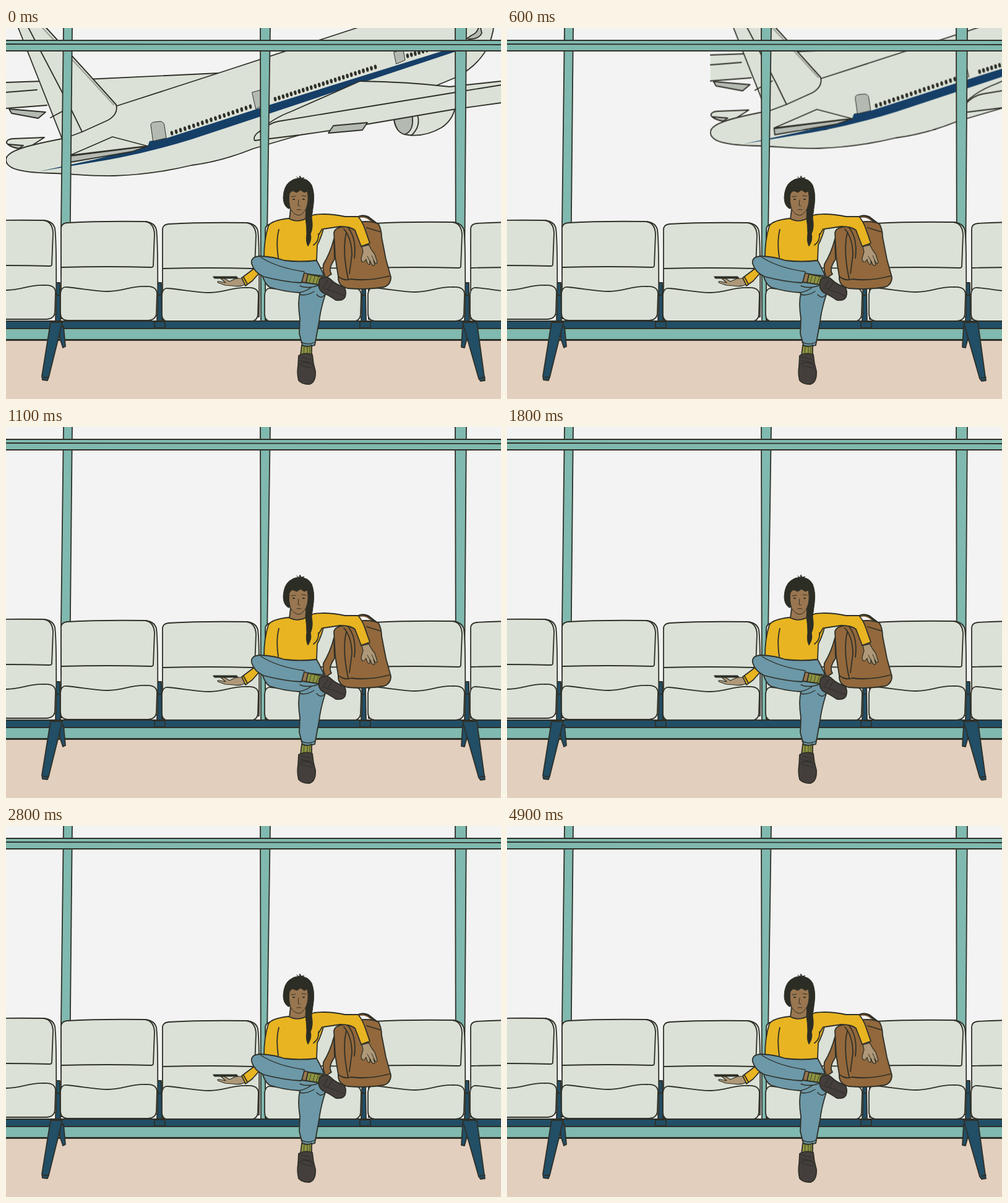
Animation, 800 px wide and 600 px high, one loop 5 s. Source, as an HTML page:

```html
<!DOCTYPE html>
<html lang="en">
<head>
<meta charset="utf-8">
<title>Departure lounge</title>
<style>
html, body { margin: 0; width: 100%; height: 100%; overflow: hidden; background: #f3f3f3; }
svg { display: block; width: 100vw; height: 100vh; }
.ink { stroke: #2f3028; stroke-width: 1.8; stroke-linejoin: round; stroke-linecap: round; }
.line { fill: none; }
.pale { fill: #dbe1d7; }
.grey { fill: #b4b9b2; }
.teal { fill: #80b9af; }
.navy { fill: #224e66; }
.skin { fill: #997650; }
.hand { fill: #ae9878; }
.wool { fill: #e8b421; }
.denim { fill: #6c98a8; }
.sock { fill: #8d9440; }
.shoe { fill: #443e3c; }
.bag { fill: #92683c; }
.hair { fill: #2c2d24; }
</style>
</head>
<body>
<svg viewBox="0 0 800 600">
  <defs>
    <g id="chair" class="ink">
      <path class="pale" d="M89 470 L89 324 Q89 316 99 315 Q150 312 224 313 Q240 314 243 326 Q246 345 245 465 Z"/>
      <path class="line" d="M226 313 Q239 316 240 333 L238 384 Q238 387 234 387 Q165 385 90 387"/>
      <path class="pale" d="M88 430 Q89 418 98 419 C122 421 143 426 165 426 C190 426 200 417 226 418 Q243 417 244 429 L243 462 Q242 472 230 473 L99 473 Q88 472 88 461 Z"/>
    </g>
    <g id="post" class="ink">
      <path d="M246 321 L252 321 L252 413 L246 413 Z" fill="#f0f2ef" stroke="none"/>
      <path class="navy" d="M245 412 L251 412 L252 475 L244 475 Z"/>
      <path class="line" d="M246 432 L251 432"/>
    </g>
  </defs>

  <rect width="800" height="600" fill="#f3f3f3"/>

  <g id="plane" class="ink">
    <path class="pale" d="M0 88 L343 73 L178 126 L60 126 L0 130 Z" stroke="none"/>
    <path class="line" d="M0 88 L88 85 L343 73 M0 130 L66 125 M0 104 L50 100"/>
    <path class="grey" d="M5 131 L64 136 L52 146 L9 138 Z"/>
    <path class="pale" d="M1 186 Q0 180 12 179 L62 177 L34 195 L20 195 Q4 191 1 186 Z"/>
    <path class="grey" d="M3 188 L28 190 L21 195 Q8 193 3 188 Z"/>
    <path class="pale" d="M0 213 C0 200 28 191 91 179 Q165 150 179 126 L343 73 L600 -11 L650 -45 L788 -45 C794 5 784 50 727 80 C650 112 570 145 475 173 L400 195 Q348 216 300 222 Q238 237 175 239 C135 240 110 236 78 235 C28 234 0 229 0 213 Z"/>
    <path fill="#163f68" stroke="none" d="M53 232 L142 213 L229 191 L232 183 L260 178 L427 124 L700 39 L733 30 L727 38 L427 138 L300 180 Q220 205 142 217 Z"/>
    <path class="pale" d="M12 -20 L91 180 L123 168 L165 149 Q182 139 178 124 L132 73 L47 -20 Z"/>
    <path class="line" d="M26 -20 L107 135 L123 168 M72 145 L100 130"/>
    <path class="line" d="M49 -11 L130 76 L174 124" stroke="#a1a69d" stroke-width="2.5"/>
    <path class="line" d="M47 -20 L132 73 L178 124"/>
    <path class="grey" d="M103 207 L229 191 L203 200 L104 217 Z"/>
    <path class="pale" d="M103 206 L140 190 L172 176 L229 191 L210 193 Z"/>
    <g class="grey" stroke-width="1">
      <path d="M234 157 Q234 153 240 152 L250 151 Q256 153 256 158 L259 178 L238 183 Z"/>
      <path d="M398 104 L412 100 L418 123 L404 131 Z"/>
      <path d="M627 39 L642 35 L645 52 L631 58 Z"/>
    </g>
    <g id="ports" fill="#2f3028" stroke="none"></g>
    <path class="grey" d="M745 17 L752 12 Q764 8 765 -8 L769 8 Q765 18 748 18 Z"/>
    <path class="pale" d="M627 146 Q628 166 644 172 Q675 178 704 161 Q722 149 726 128 Z"/>
    <path class="grey" d="M627 145 Q629 168 644 172 Q661 167 656 138 Z"/>
    <path class="line" d="M664 138 Q672 158 655 174"/>
    <path class="pale" d="M402 182 Q398 175 410 167 Q429 147 461 135 L572 86 Q650 87 717 95 L800 86 L1000 55 L1000 95 L800 121 L727 131 L523 166 L475 173 Z"/>
    <path class="line" d="M411 169 Q423 154 440 151 L727 104 L1000 60"/>
    <path class="grey" d="M529 158 L584 153 L576 165 L521 170 Z"/>
  </g>

  <g class="ink">
    <path class="teal" d="M93 -3 L107 -3 L103 400 L88 400 Z"/>
    <path class="teal" d="M411 -3 L427 -3 L420 474 L412 474 Z"/>
    <path class="teal" d="M726 -3 L744 -3 L741 400 L727 400 Z"/>
    <path class="teal" d="M-3 20 L803 20 L803 37 L-3 37 Z"/>
    <path class="line" d="M0 26 L800 27"/>
    <rect x="-3" y="505" width="806" height="98" fill="#e3cfbe"/>
    <path class="teal" d="M-3 485 L803 485 L803 504 L-3 504 Z"/>
  </g>

  <g id="seats"></g>

  <g class="ink navy">
    <path d="M-3 474 L803 474 L803 486 L-3 486 Z"/>
    <path d="M240 475 h17 v10 h-17 Z M572 475 h17 v10 h-17 Z"/>
    <path d="M86 485 L93 482 L96 515 L92 517 L87 502 Z"/>
    <path d="M72 476 L91 476 L69 565 L67 570 L59 569 L58 563 Z"/>
    <path d="M745 485 L738 482 L736 516 L741 517 L745 502 Z"/>
    <path d="M738 476 L761 476 L773 564 L774 570 L767 571 L764 567 Z"/>
    <path class="line" d="M61 565 L68 565 M767 566 L774 565"/>
  </g>

  <g class="ink" stroke-width="1.6">
    <path class="line" d="M568 307 Q575 302 585 306 L598 316" stroke-width="4"/>
    <path class="line" d="M569 307 Q576 304 584 308 L595 316" stroke="#92683c" stroke-width="1.4"/>
    <path class="bag" d="M530 341 Q524 364 513 382 Q511 394 517 404 L526 398 Q520 390 531 374 Z"/>
    <path class="bag" d="M530 331 Q532 322 548 321 L568 314 Q591 311 602 317 Q607 326 607 338 L614 374 L622 403 Q622 415 611 419 Q583 424 552 421 Q536 417 537 402 L532 370 Z"/>
    <path class="line" d="M546 325 Q559 340 559 367 L555 397 M553 323 Q567 341 563 372 M550 331 Q543 360 553 406 M537 402 Q548 410 558 406 Q586 410 620 401 M583 323 L606 330"/>

    <path class="skin" d="M460 292 L486 292 L489 308 Q474 316 458 309 Z"/>
    <path class="wool" d="M457 308 Q473 317 490 305 L498 302 Q520 299 548 305 L569 305 Q576 313 580 325 L588 348 L574 353 L564 327 Q557 321 540 321 L513 325 Q509 340 503 351 L502 376 Q470 382 438 374 L430 377 L417 371 Q417 342 424 320 Q429 311 457 308 Z"/>
    <path class="line" d="M441 326 Q436 345 440 371 M505 333 Q506 345 497 351 M511 325 L505 335"/>
    <path class="wool" d="M401 389 L412 393 L398 409 L387 417 L381 404 Z"/>
    <path class="line" d="M384 403 L390 414"/>
    <path class="hand" stroke-width="1.2" d="M381 405 L386 415 Q378 419 367 417 L354 416 L343 412 Q340 409 346 410 L355 412 L347 405 Q352 403 361 410 L372 405 Z"/>
    <path class="hair" stroke-width="1" d="M335 402 L373 402 L375 405 L337 405 Z"/>
    <path class="hand" stroke-width="1.2" d="M575 353 L586 350 Q590 359 596 366 L600 379 Q598 384 594 376 L596 383 Q592 387 588 376 L588 382 Q584 384 582 374 L579 378 Q574 380 574 372 L577 362 Z"/>
    <path class="line" stroke-width="1" d="M591 368 L596 379 M584 369 L590 380 M574 354 L587 351"/>

    <path class="denim" d="M414 399 Q418 414 426 419 Q450 427 475 428 Q471 444 475 470 L474 494 L479 513 Q489 517 499 513 L506 475 Q508 456 516 431 Q512 412 500 406 Z"/>
    <path class="denim" d="M397 381 Q395 370 410 369 Q434 370 450 376 Q476 379 502 376 Q509 388 514 401 L486 398 L477 412 Q451 411 416 402 Q401 395 397 381 Z"/>
    <path class="line" d="M412 371 Q439 388 482 394 M475 417 Q488 423 508 415 M474 428 Q487 425 494 419 M475 431 Q485 434 498 426 M502 431 Q510 440 516 430 M477 508 Q489 514 499 508" stroke-width="1.4"/>
    <path class="skin" d="M482 396 L489 398 L485 412 L478 411 Z"/>
    <path class="sock" d="M488 398 L512 403 L505 415 L485 412 Z"/>
    <path class="line" d="M493 401 L490 412 M499 402 L496 413 M505 403 L501 414" stroke-width=".8"/>
    <path class="shoe" d="M507 406 Q517 399 525 407 Q533 415 546 419 Q551 425 548 435 Q544 442 533 440 Q521 432 512 428 Q502 421 507 406 Z"/>
    <path class="line" d="M511 420 Q528 425 547 433 M520 408 L514 418 M527 412 L520 423" stroke-width="1.2"/>
    <path class="sock" d="M478 513 Q487 517 494 513 L494 529 L476 529 Z"/>
    <path class="line" d="M482 515 L481 529 M487 516 L487 529 M491 515 L491 528" stroke-width=".8"/>
    <path class="shoe" d="M473 530 Q483 524 495 528 Q496 542 500 555 Q501 572 491 576 Q479 577 473 570 Q470 558 472 547 Z"/>
    <path class="line" d="M474 544 Q485 537 497 546 M477 532 L492 536 M476 538 L493 541 M477 546 L495 550" stroke-width="1.2"/>

    <path class="hair" stroke-width="1" d="M456 292 Q448 287 448 274 Q449 256 458 249 Q465 243 474 243 Q488 243 494 254 Q499 267 497 284 L494 307 Q497 323 492 333 Q495 342 488 353 Q484 345 486 333 Q486 320 484 307 L485 288 Z"/>
    <path class="hair" stroke-width="1" d="M470 241 L474 244 L475 239 L477 243 L482 242 L476 246 Z"/>
    <path class="skin" d="M458 268 Q462 262 465 264 L470 266 L476 262 L482 266 L487 264 Q490 280 485 292 Q479 303 473 303 Q465 302 460 293 Q456 280 458 268 Z" stroke-width="1"/>
    <path class="line" d="M461 273 L468 272 M478 271 L485 272 M473 278 L472 287 L475 288 M470 294 Q473 293 477 294" stroke-width="1"/>
    <path class="line" d="M464 277 h2 M480 277 h2" stroke-width="2"/>
  </g>
</svg>
<script>
const NS = 'http://www.w3.org/2000/svg';
const byId = id => document.getElementById(id);

function add(parent, tag, attrs) {
  const el = document.createElementNS(NS, tag);
  for (const key in attrs) el.setAttribute(key, attrs[key]);
  parent.append(el);
}

// Seats: x shift, y shift, post on the right.
const seats = [
  [-164, -2, true], [0, 0, true], [164, 2, false],
  [330, 2, true], [497, 1, true], [662, 1, false]
];
for (const [x, y, post] of seats) {
  if (post) add(byId('seats'), 'use', { href: '#post', x });
  add(byId('seats'), 'use', { href: '#chair', x, y });
}

// Rows of cabin windows: start, end, count.
const rows = [
  [268, 170, 395, 127, 19],
  [435, 115, 597, 63, 26],
  [649, 45, 686, 34, 7]
];
for (const [x1, y1, x2, y2, n] of rows) {
  for (let i = 0; i < n; i++) {
    const k = i / (n - 1);
    const cx = x1 + (x2 - x1) * k, cy = y1 + (y2 - y1) * k;
    add(byId('ports'), 'ellipse', {
      cx, cy, rx: 2.2, ry: 3.7, transform: `rotate(-12 ${cx} ${cy})`
    });
  }
}

// The plane accelerates to the right while its path bends upward.
const LOOP = 5000, STEP = 100, GONE = 1200;
const place = t => {
  const x = 0.1657 * t + 0.000637 * t * t;
  const y = 0.1074 * t - 0.0003024 * t * t;
  return `translate(${x.toFixed(1)}px, ${y.toFixed(1)}px)`;
};
const flight = [];
for (let t = 0; t <= GONE; t += STEP) {
  flight.push({ offset: t / LOOP, transform: place(t), easing: 'steps(1, end)' });
}
flight.push({ offset: 1, transform: place(GONE) });
byId('plane').animate(flight, { duration: LOOP, iterations: Infinity });
</script>
</body>
</html>
```
